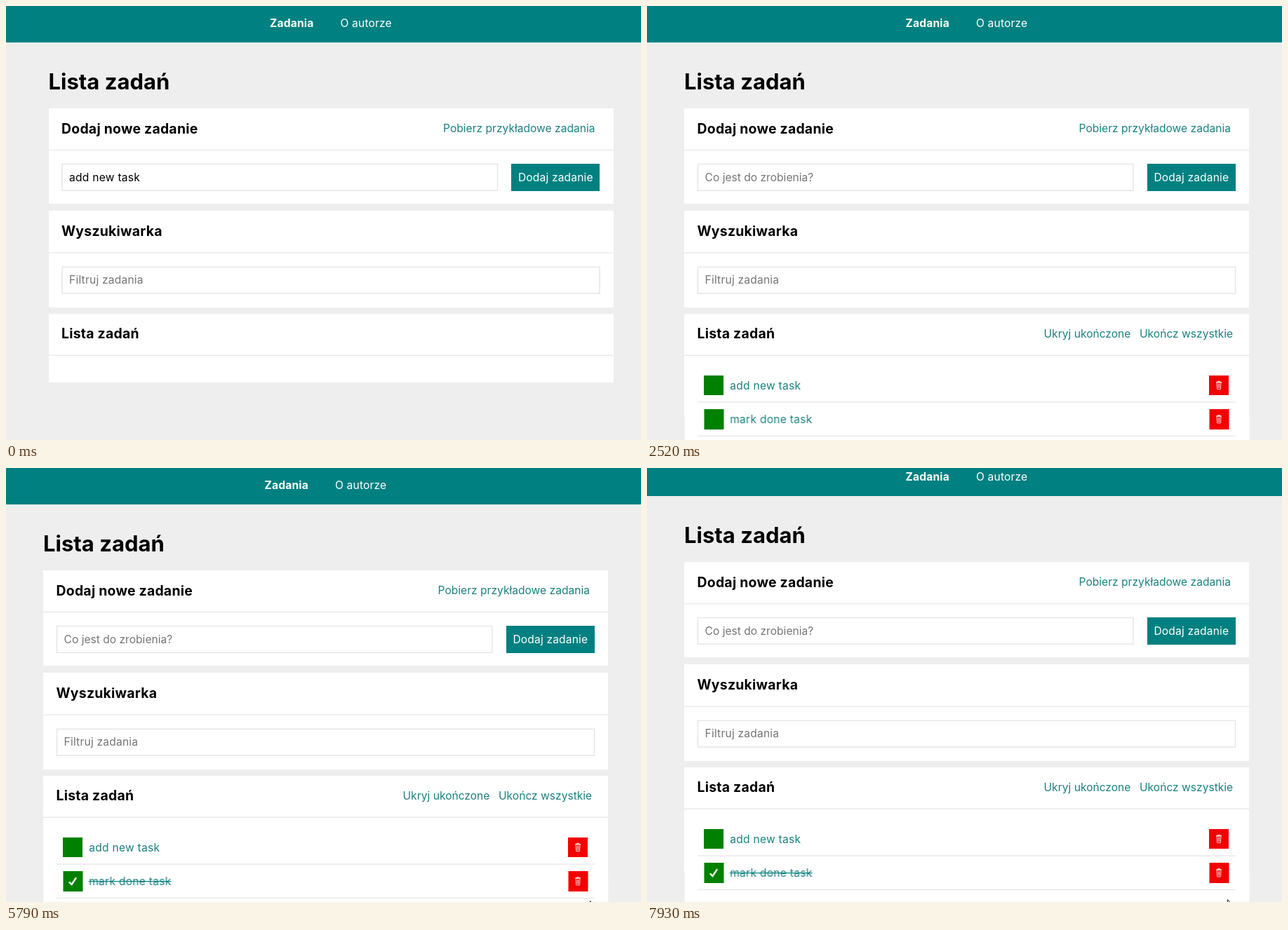
Recreate the animation shown at these times as an HTML page. Size 905x619 px, loop 8000 ms.

```html
<!DOCTYPE html>
<html lang="pl">
<head>
<meta charset="utf-8">
<title>Lista zadań</title>
<style>
html, body { margin: 0; width: 100%; height: 100%; overflow: hidden; background: #eee; }
svg { display: block; width: 905px; height: 619px; }
text { font: 15.6px Inter, sans-serif; white-space: pre; }
.title { font-size: 31px; font-weight: 700; }
.head { font-size: 19.4px; font-weight: 700; letter-spacing: .25px; }
.link, .task { fill: #1c8080; }
.task { letter-spacing: .25px; }
.hint { fill: #757575; }
.light { fill: #fff; letter-spacing: .15px; }
.strong { font-weight: 700; }
.panel { fill: #fff; }
.rule { fill: #eaeaea; }
.field { fill: #fff; stroke: #e6e6e6; stroke-width: 1.5; }
.focus { fill: none; stroke: #000; stroke-width: 2; }
.teal { fill: #008080; }
.crisp { shape-rendering: crispEdges; }

/* Hard switches */
.step { animation: 8s step-end infinite; }
#page { animation-name: scroll; }
#typed { animation-name: typed; }
#hint, #list { animation-name: submitted; }
#focus { animation-name: focus; }
#caret { animation-name: caret; }
.added { animation-name: added; }
#third { animation-name: third; }
#done { animation-name: done; }
#boxHover { animation-name: boxHover; }
#binHover { animation-name: binHover; }
#arrow { animation-name: arrow; }
#hand { animation-name: hand; }

/* Gradual changes */
#button { transform-box: fill-box; transform-origin: center; animation: grow 8s linear infinite; }
#button rect { animation: shade 8s linear infinite; }
#cursor { animation: move 8s linear infinite; }
#pointer { animation: fade 8s linear infinite; }
#click { animation: click 8s linear infinite; }

@keyframes scroll {
  0% { transform: none; }
  31.5% { transform: translate(-7.5px, 0); }
  74.125% { transform: translate(-7.5px, -60.7px); }
  94.25%, 100% { transform: translate(-7.5px, -12px); }
}
@keyframes typed { 0% { opacity: 1; } 14.75%, 100% { opacity: 0; } }
@keyframes submitted { 0% { opacity: 0; } 14.75%, 100% { opacity: 1; } }
@keyframes focus { 0%, 31.5%, 100% { opacity: 0; } 14.75% { opacity: 1; } }
@keyframes caret { 0%, 21.75%, 31.5%, 100% { opacity: 0; } 14.75%, 28.125% { opacity: 1; } }
@keyframes added { 0% { opacity: 0; } 31.5%, 100% { opacity: 1; } }
@keyframes third { 0%, 94.25%, 100% { opacity: 0; } 31.5% { opacity: 1; } }
@keyframes done { 0% { opacity: 0; } 53.25%, 100% { opacity: 1; } }
@keyframes boxHover { 0%, 72.375%, 100% { opacity: 0; } 46.5% { opacity: 1; } }
@keyframes binHover { 0%, 94.25%, 100% { opacity: 0; } 88.25% { opacity: 1; } }
@keyframes arrow { 0%, 20%, 72.375%, 96.25%, 100% { opacity: 1; } 8.125%, 46.5%, 88.25% { opacity: 0; } }
@keyframes hand { 0%, 20%, 72.375%, 96.25%, 100% { opacity: 0; } 8.125%, 46.5%, 88.25% { opacity: 1; } }
@keyframes grow {
  0%, 7.5%, 22%, 100% { transform: none; }
  9.5%, 20% { transform: scale(1.1); }
}
@keyframes shade { 0%, 7.5%, 22%, 100% { fill: #008080; } 9.5%, 20% { fill: #009a9a; } }
@keyframes move {
  0% { transform: translate(890px, 625px); }
  .875% { transform: translate(886px, 608px); animation-timing-function: ease-in-out; }
  9.75%, 18.8% { transform: translate(783px, 252px); animation-timing-function: ease-in; }
  24.875% { transform: translate(852px, 622px); }
  35.6% { transform: translate(562px, 622px); animation-timing-function: ease-out; }
  39% { transform: translate(400px, 333px); animation-timing-function: ease-in-out; }
  42.375% { transform: translate(189px, 522px); animation-timing-function: ease-out; }
  45.625% { transform: translate(101px, 573px); animation-timing-function: ease-out; }
  48.125%, 59% { transform: translate(90px, 582px); }
  72.3% { transform: translate(834px, 624px); }
  72.375% { transform: translate(832px, 617px); }
  74.125% { transform: translate(834px, 624px); animation-timing-function: ease-out; }
  79% { transform: translate(862px, 585px); }
  84.125% { transform: translate(895px, 572px); animation-timing-function: ease-in-out; }
  90%, 94.25% { transform: translate(823px, 574px); animation-timing-function: ease-in; }
  99.125% { transform: translate(827px, 615px); }
  100% { transform: translate(828px, 622px); }
}
@keyframes fade { 0%, 56.625%, 72.375%, 100% { opacity: 1; } 59%, 72.3% { opacity: 0; } }
@keyframes click {
  0%, 12.9%, 15.5%, 51.4%, 54.875%, 92.4%, 95%, 100% { opacity: 0; }
  13%, 14%, 51.5%, 53%, 92.5%, 94% { opacity: .6; }
}
</style>
</head>
<body>
<svg viewBox="0 0 905 619">
  <defs>
    <g id="bin" fill="none" stroke="#fff">
      <path d="M819.4 537l.8 9.6h4.6l.8-9.6zM821.6 538.5v6.5M823.4 538.5v6.5" stroke-width=".8"/>
      <path d="M818.6 536.4h7.8M821 535.3h3" stroke-width="1"/>
    </g>
    <g id="row">
      <rect class="panel crisp" x="60.5" y="536.3" width="805" height="48.5"/>
      <rect class="crisp" x="88.5" y="527" width="28.2" height="28.2" fill="#008000"/>
      <rect class="crisp" x="808.7" y="527" width="28.2" height="28.2" fill="#f20000"/>
      <use href="#bin"/>
      <rect class="rule" x="79.5" y="564.3" width="767" height="1.5"/>
    </g>
  </defs>

  <g id="page" class="step">
    <rect class="teal crisp" x="-10" width="935" height="52.4"/>
    <text class="light strong" x="376" y="30">Zadania</text>
    <text class="light" x="476.5" y="30">O autorze</text>
    <text class="title" x="60.5" y="119">Lista zadań</text>

    <rect class="panel crisp" x="60.5" y="146.3" width="805" height="136"/>
    <rect class="rule" x="60.5" y="204.8" width="805" height="1.5"/>
    <text class="head" x="79" y="182">Dodaj nowe zadanie</text>
    <text class="link" x="623" y="180">Pobierz przykładowe zadania</text>
    <rect class="field" x="80" y="225.5" width="620.5" height="37.7"/>
    <text id="typed" class="step" x="90" y="249.7" letter-spacing=".25">add new task</text>
    <text id="hint" class="hint step" x="90" y="249.7">Co jest do zrobienia?</text>
    <rect id="focus" class="focus step" x="80.3" y="225.8" width="620" height="37.2" rx="2"/>
    <rect id="caret" class="step crisp" x="90" y="236" width="1" height="17"/>
    <g id="button">
      <rect class="teal crisp" x="720.1" y="225" width="126.2" height="39"/>
      <text class="light" x="783.3" y="249.7" text-anchor="middle">Dodaj zadanie</text>
    </g>

    <rect class="panel crisp" x="60.5" y="292.3" width="805" height="137.2"/>
    <rect class="rule" x="60.5" y="351.3" width="805" height="1.5"/>
    <text class="head" x="79" y="328">Wyszukiwarka</text>
    <rect class="field" x="80" y="372.3" width="766" height="37.7"/>
    <text class="hint" x="90" y="396.2" letter-spacing=".2">Filtruj zadania</text>

    <rect class="panel crisp" x="60.5" y="438.5" width="805" height="98"/>
    <rect class="rule" x="60.5" y="497.5" width="805" height="1.5"/>
    <text class="head" x="79" y="474">Lista zadań</text>

    <g id="list" class="step">
      <text class="link" x="573" y="473">Ukryj ukończone</text>
      <text class="link" x="709.5" y="473">Ukończ wszystkie</text>
      <use href="#row"/>
      <text class="task" x="125.7" y="546.5">add new task</text>
    </g>
    <g class="added step">
      <use href="#row" y="48.4"/>
      <rect id="boxHover" class="step crisp" x="88.5" y="575.4" width="28.2" height="28.2" fill="#009a00"/>
      <text class="task" x="125.7" y="594.7">mark done task</text>
      <g id="done" class="step">
        <path d="M97.4 590.2l3.6 4 6.6-10" fill="none" stroke="#fff" stroke-width="2.3"/>
        <rect class="teal" x="125.5" y="589" width="117.5" height="1.2"/>
      </g>
    </g>
    <g id="third" class="step">
      <use href="#row" y="96.8"/>
      <g id="binHover" class="step">
        <rect class="crisp" x="808.7" y="623.8" width="28.2" height="28.2" fill="#f00"/>
        <use href="#bin" y="96.8"/>
      </g>
      <text class="task" x="125.7" y="643">delete task</text>
    </g>
  </g>

  <g id="cursor">
    <circle id="click" cx="-1" cy="1" r="11" fill="#ffee00"/>
    <g id="pointer" fill="#fff" stroke="#111" stroke-linejoin="round">
      <path id="arrow" class="step" d="M.5.5V12.3L3.2 9.8 5.1 14.2 7 13.4 5.1 9.1H8.6Z" stroke-width=".9"/>
      <path id="hand" class="step" d="M-1.5 1.6a1.3 1.3 0 0 1 2.6 0V6l4.4 1q2 .5 1.9 2.5l-.6 3.8-1 2v2.3h-6v-1.8l-4-5.3q-1-1.9.5-2.4l2.2 1.6z" stroke-width=".9"/>
    </g>
  </g>
</svg>
</body>
</html>
```
